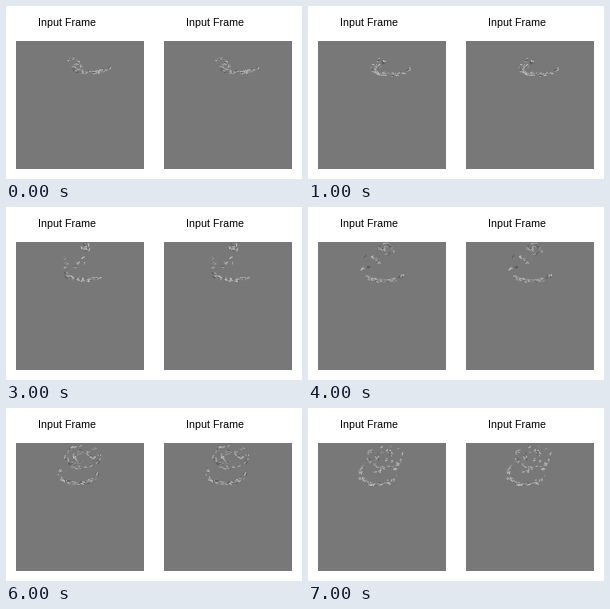
Animation, 296 px wide and 173 px high, one loop 8 s. Source, as a matplotlib script:

```python
import numpy as np
import matplotlib.pyplot as plt
from matplotlib.animation import FuncAnimation
from matplotlib.collections import LineCollection
from matplotlib.patches import Rectangle

W, H, DPI = 296, 173, 100
PANELS = (10, 158)
TOP, SIDE = 35, 128
GRAY = 0.47
STEPS = 8

fig = plt.figure(figsize=(W / DPI, H / DPI), dpi=DPI, facecolor="white")
ax = fig.add_axes([0, 0, 1, 1])
ax.set(xlim=(0, W), ylim=(H, 0))
ax.axis("off")

layers = []
for left in PANELS:
    ax.add_patch(Rectangle((left, TOP), SIDE, SIDE, fc=str(GRAY), lw=0))
    ax.text(left + 22, 20, "Input Frame", family="Liberation Sans",
            size=10.6 * 72 / DPI, color="black", va="baseline")
    layer = LineCollection([], linewidths=0.8, capstyle="butt")
    ax.add_collection(layer)
    layers.append(layer)


def ramp(t, start, end):
    return np.clip((t - start) / (end - start), 0, 1)


def arc(rng, n, centre, radii, start, end, spread):
    """Random points near an elliptic arc, with the arc's direction."""
    a = np.radians(rng.uniform(start, end, n))
    ring = np.column_stack([np.cos(a), np.sin(a)]) * radii
    tangent = np.arctan2(radii[1] * np.cos(a), -radii[0] * np.sin(a))
    return centre + ring + rng.uniform(-spread, spread, (n, 2)), tangent


def bowl(rng, t):
    """Lower rim: drifts left, sinks and closes up its left side."""
    centre = (85 - 2.2 * t, 60 + 5 * ramp(t, 0, 3))
    radii = (19, 6 + 0.75 * t)
    sweep = 180 + 45 * ramp(t, 4, 6)
    return [arc(rng, 34, centre, radii, 45, 155, 1.8),
            arc(rng, 20, centre, radii, 0, sweep, 1.6)]


def crown(rng, t):
    """Upper loop: enters at the top edge and widens."""
    grow = ramp(t, 2, 6)
    if grow == 0:
        return []
    size = grow ** 1.7
    centre = (80 - 3 * grow, 39 + 10 * size)
    radii = np.array([2 + 15 * size, 2 + 9 * size])
    n = int(10 + 28 * size)
    return [arc(rng, n, centre, radii, 0, 360, 1.5),
            arc(rng, n // 2, centre, radii / 2, 90, 330, 2)]


def strays(rng, t):
    """Small clumps left of and above the rim."""
    spread = ramp(t, 0, 5)
    low = (60 - 8 * spread, 52 - 4 * spread)
    high = (76 + 12 * spread, 61 + 4 * spread)
    return [(spot + rng.uniform(-1.2, 1.2, (3, 2)), rng.normal(-0.4, 0.4, 3))
            for spot in rng.uniform(low, high, (7, 2))]


def scatter(t):
    """Short ragged strokes and their gray levels for one step."""
    rng = np.random.default_rng(40 + t)
    groups = bowl(rng, t) + crown(rng, t) + strays(rng, t)
    points = np.concatenate([g[0] for g in groups])
    angles = np.concatenate([g[1] for g in groups])
    n = len(points)
    angles = angles + rng.normal(0, 0.4, n)
    half = rng.uniform(0.6, 1.8, (n, 1)) * np.column_stack(
        [np.cos(angles), np.sin(angles)])
    segments = np.stack([points - half, points + half], axis=1)
    segments[..., 1] = np.maximum(segments[..., 1], TOP + 1)
    shades = np.where(rng.random(n) < 0.2, rng.uniform(0.34, 0.42, n),
                      rng.uniform(0.54, 0.76, n))
    return segments, [str(v) for v in shades]


def update(i):
    segments, shades = scatter(i)
    for left, layer in zip(PANELS, layers):
        layer.set_segments(segments + [left - PANELS[0], 0])
        layer.set_color(shades)
    return layers


anim = FuncAnimation(fig, update, frames=STEPS, interval=1000,
                     repeat=True, repeat_delay=0)
plt.show()
```
